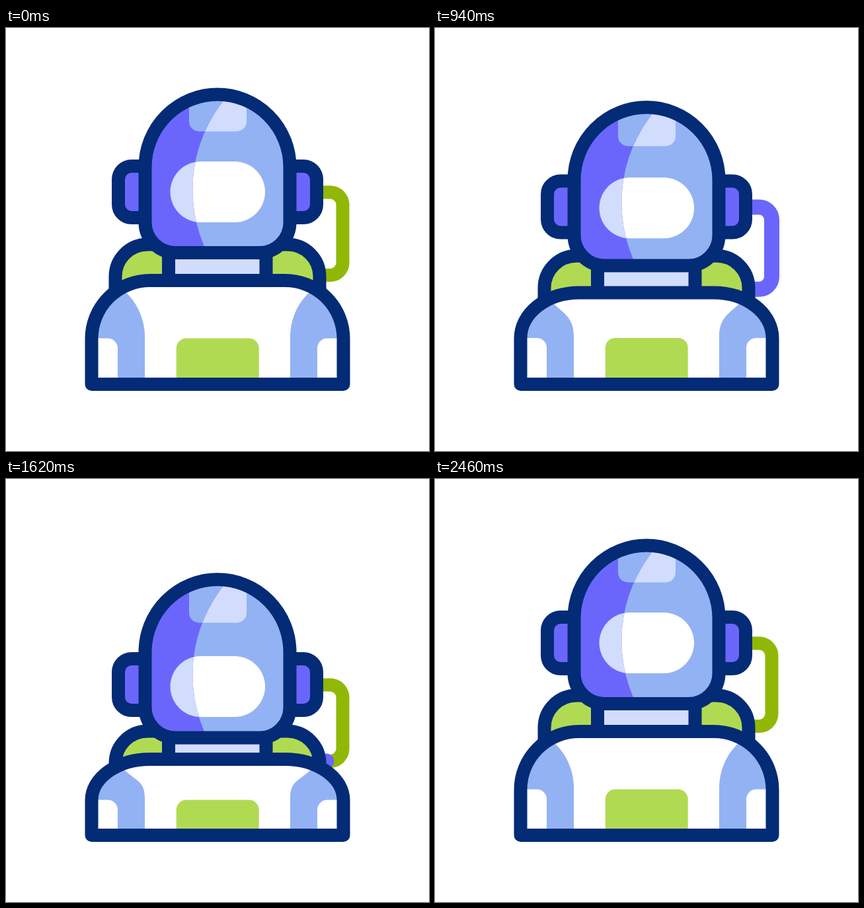
Write an HTML page that moves like this. It is 640x640 px and loops after 2.66 s.

```html
<!DOCTYPE html>
<html lang="en">
<head>
<meta charset="utf-8">
<title>Astronaut</title>
<style>
  html, body { margin: 0; width: 100%; height: 100%; overflow: hidden; background: #fff; }
  svg { display: block; width: 100vw; height: 100vh; }
  .line { stroke: #032b76; stroke-width: 20; stroke-linejoin: round; }
  .blue { fill: #93b2f4; }
  .purple { fill: #6a66fb; }
  .pale { fill: #d2dcfd; }
  .lime { fill: #b1da53; }
  .white { fill: #fff; }
  .tube { fill: none; stroke: #91b806; stroke-width: 20; }
  #flow { stroke: #6a66fb; stroke-width: 23; stroke-linecap: round; }
</style>
</head>
<body>
<svg viewBox="0 0 640 640">
  <defs>
    <path id="dome" d="M210.5 210.5a109.5 110 0 0 1 219 0V294a46 46 0 0 1-46 46H256.500a46 46 0 0 1-46-46Z"/>
    <clipPath id="domeClip"><use href="#dome"/></clipPath>
    <clipPath id="shadeClip"><path d="M347 90A217 217 0 0 0 307 345H190V90Z"/></clipPath>
    <clipPath id="bodyClip"><path class="torso"/></clipPath>
    <rect id="badge" x="277" y="60" width="87" height="96.500" rx="15"/>
    <rect id="visor" x="248.500" y="202" width="143.500" height="92" rx="46"/>
    <path id="ear" class="purple line" d="M215 209H190a20 20 0 0 0-20 20V267a20 20 0 0 0 20 20H215"/>
    <g id="arm">
      <path id="sleeve" class="blue"/>
      <path id="cuff" class="white" d="M120 469.500H154a15 15 0 0 1 15 15V570H120Z"/>
    </g>
  </defs>

  <path class="tube"/>
  <path class="tube" id="flow" pathLength="100"/>
  <path id="pack" class="lime line" d="M165.500 470V376a48.500 48.500 0 0 1 48.500-48.500H426a48.500 48.500 0 0 1 48.500 48.500V470"/>
  <g id="ears">
    <use href="#ear"/>
    <use href="#ear" transform="matrix(-1 0 0 1 640 0)"/>
  </g>
  <g id="head">
    <rect class="pale line" x="246" y="335" width="147.500" height="85"/>
    <g clip-path="url(#domeClip)">
      <use href="#dome" class="blue"/>
      <use href="#badge" class="pale badge"/>
      <use href="#visor" class="white visor"/>
      <g clip-path="url(#shadeClip)">
        <use href="#dome" class="purple"/>
        <use href="#badge" class="blue badge"/>
        <use href="#visor" class="pale visor"/>
      </g>
    </g>
    <use href="#dome" class="line" fill="none"/>
  </g>
  <path class="torso white"/>
  <g clip-path="url(#bodyClip)">
    <use href="#arm"/>
    <use href="#arm" transform="matrix(-1 0 0 1 640 0)"/>
    <path id="panel" class="lime" d="M257.700 570V484.500a15 15 0 0 1 15-15H367.700a15 15 0 0 1 15 15V570Z"/>
  </g>
  <path class="torso line" fill="none"/>
</svg>
<script>
const LOOP = 2660, STEP = 20;
const $ = s => document.querySelectorAll(s);
const smooth = x => x * x * (3 - 2 * x);
const quad = x => x < .5 ? 2 * x * x : 1 - 2 * (1 - x) * (1 - x);
const ramp = (t, a, b, ease = smooth) => ease(Math.min(1, Math.max(0, (t - a) / (b - a))));

// Jump up, sink down, jump again, settle: vertical offset from rest.
const bounce = (t, up, down, up2, lag = 0, end = 2310) =>
  up * ramp(t, 220, 366) +
  (down - up) * ramp(t, 366, 1295) +
  (up2 - down) * ramp(t, 1687 + lag, 1987 + lag, quad) -
  up2 * ramp(t, 1987, end);

const set = (sel, name, value) => $(sel).forEach(e => e.setAttribute(name, value));
const shift = (sel, y) => set(sel, "transform", `translate(0 ${y})`);

function draw(t) {
  const head = bounce(t, -46.5, 51.5, -38.5);
  shift("#head", head);
  shift("#ears", bounce(t, -61, 63, -49.5, 8));
  shift(".visor", bounce(t, -61.7, 66, -53.2, 8) - head);
  shift(".badge", bounce(t, -58, 61, -49.4, 8) - head);
  shift("#pack", bounce(t, -58.5, 54, -40, 0, 2460));

  const top = 382 + bounce(t, -30, 42, -23.8);
  const chest = bounce(t, -34.6, 16, -34);
  const side = 470 + chest, ry = side - top;
  set(".torso", "d", `M129.500 539V${side}A88.500 ${ry} 0 0 1 218 ${top}H422A88.500 ${ry} 0 0 1 510.500 ${side}V539Z`);
  set("#sleeve", "d", `M120 ${top}H160L181 ${top + 18}C199 ${top + 34} 210 ${side - 28} 210 ${side - 3}V570H120Z`);
  shift("#cuff, #panel", chest);

  const y1 = 374 + bounce(t, -44.4, 53, -36);
  const y2 = 248.5 + bounce(t, -61, 63, -44);
  set(".tube", "d", `M470 ${y1}H490.500a19 19 0 0 0 19-19V${y2 + 19}a19 19 0 0 0-19-19H470`);
  const fill = 100 * (ramp(t, 550, 925) - ramp(t, 925, 1770));
  set("#flow", "stroke-dasharray", `${fill} 300`);
  set("#flow", "visibility", fill > .5 ? "visible" : "hidden");
}

const start = performance.now();
function tick() {
  const t = (performance.now() - start) % LOOP;
  draw(Math.floor(t / STEP) * STEP);
  requestAnimationFrame(tick);
}
tick();
</script>
</body>
</html>
```
